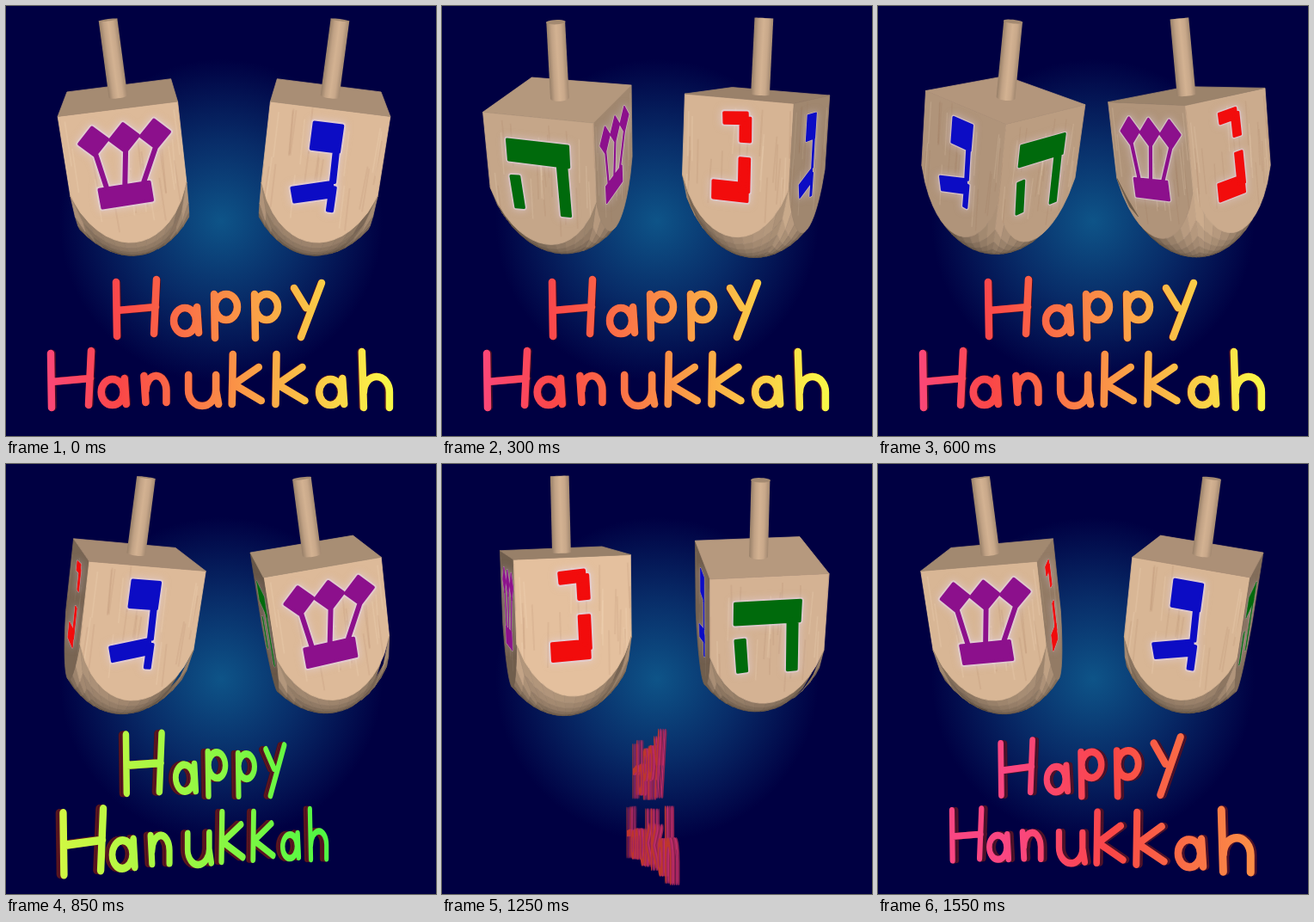
These frames come from a looping animation (500x500 px, 1600 ms). An HTML page with a canvas:

```html
<!DOCTYPE html>
<html lang="en">
<head>
<meta charset="utf-8">
<title>Happy Hanukkah</title>
<style>
  html, body { margin: 0; height: 100%; overflow: hidden; background: #000042; }
  canvas { display: block; }
</style>
</head>
<body>
<canvas id="stage" width="500" height="500" role="img" aria-label="Happy Hanukkah"></canvas>
<script>
const ctx = document.getElementById('stage').getContext('2d');
const LOOP = 1600, STEP = 50, TAU = Math.PI * 2;
const range = (n, f) => Array.from({ length: n }, (_, i) => f(i));
const clamp = (v, lo, hi) => Math.max(lo, Math.min(hi, v));

// Dreidel geometry, measured from its pivot (x right, y up, z to the viewer)
const HALF = 63.5, TOP = 81, STEM_TOP = 167, STEM_R = 10.5, LENGTH = 191;
const LEAN = 0.127, PITCH = 0.3, EYE = 870, PIVOT_Y = 184;
const LIGHT = [0.1, 0.2, 0.97], WOOD = [228, 192, 158];

const shade = k => `rgb(${WOOD.map(c => Math.min(255, c * k) | 0)})`;
// The underside is the end of an ellipsoid
const bottomAt = r => LENGTH - 150 * (1 - Math.sqrt(1 - (r / 95) ** 2));

function random(seed) {
  return () => (seed = (seed * 16807) % 2147483647) / 2147483647;
}

// A straight bar of the given width, as a quad in face coordinates
function bar(x0, y0, x1, y1, width) {
  const k = width / 2 / Math.hypot(x1 - x0, y1 - y0), nx = (y0 - y1) * k, ny = (x1 - x0) * k;
  return [[x0 + nx, y0 + ny], [x1 + nx, y1 + ny], [x1 - nx, y1 - ny], [x0 - nx, y0 - ny]];
}

const SHIN = [-30, 3, 36].flatMap(x => [bar(x - 8, 40, x + 8, 24, 21), bar(x, 44, x * 0.6 - 5, 86, 2)]);
SHIN.push(bar(-31, 97, 24, 95, 21));
const NUN = [bar(-15, 22, 12, 20, 11), bar(10, 20, 11, 45, 11), bar(11, 64, 12, 100, 11), bar(-25, 102, 16, 101, 19)];
const GIMEL = [bar(-15, 31, 15, 31, 29), bar(12, 46, 13, 80, 4), bar(-28, 100, 14, 88, 16), bar(14, 86, 14, 113, 5)];
const HE = [bar(-37, 41, 34, 41, 24), bar(-31, 72, -28, 110, 10), bar(26, 50, 28, 112, 10)];
const SIDES = [[SHIN, '#8c108c'], [NUN, '#f20c0c'], [GIMEL, '#0c0cc4'], [HE, '#006a0c']];

function trace(points) {
  points.forEach(([x, y], i) => i ? ctx.lineTo(x, y) : ctx.moveTo(x, y));
  ctx.closePath();
}

function fillShape(points, style) {
  ctx.beginPath();
  trace(points);
  ctx.fillStyle = style;
  ctx.fill();
}

function dreidel(cx, yaw) {
  const cl = Math.cos(LEAN), sl = Math.sin(LEAN), cy = Math.cos(yaw), sy = Math.sin(yaw);
  const cp = Math.cos(PITCH), sp = Math.sin(PITCH);
  const turn = ([x, y, z]) => {
    [x, y] = [x * cl - y * sl, x * sl + y * cl];
    [x, z] = [x * cy + z * sy, z * cy - x * sy];
    return [x, y * cp - z * sp, z * cp + y * sp];
  };
  const flat = ([x, y, z]) => {
    const s = EYE / (EYE - z);
    return [cx + x * s, PIVOT_Y - y * s];
  };
  const project = p => flat(turn(p));

  // Fills a polygon facing the viewer; returns how squarely it faces, or 0
  function surface(points) {
    const p = points.map(turn), [o, b] = p, a = p[p.length - 1];
    const e = a.map((v, i) => v - o[i]), f = b.map((v, i) => v - o[i]);
    let n = [e[1] * f[2] - e[2] * f[1], e[2] * f[0] - e[0] * f[2], e[0] * f[1] - e[1] * f[0]];
    const len = Math.hypot(...n);
    n = n.map(v => v / len);
    if (n[2] * EYE <= n[0] * o[0] + n[1] * o[1] + n[2] * o[2]) return 0;
    const color = shade(0.45 + 0.6 * n.reduce((t, v, i) => t + v * LIGHT[i], 0));
    fillShape(p.map(flat), color);
    ctx.strokeStyle = color;
    ctx.lineWidth = 0.8;
    ctx.stroke();
    return Math.max(0.12, n[2]);
  }

  function side([parts, color], k) {
    const c = Math.round(Math.cos(k * TAU / 4)), s = Math.round(Math.sin(k * TAU / 4));
    const place = (u, v, w = HALF) => [u * c + w * s, TOP - v, w * c - u * s];
    const bowl = (u, f) => place(u * f, bottomAt(Math.hypot(u, HALF) * f), HALF * f);
    for (let i = 0; i < 10; i++) for (let j = 0; j < 8; j++) {
      const u = (i / 5 - 1) * HALF, v = u + HALF / 5, f = (j + 1) / 8, g = Math.max(0.01, j / 8);
      surface([bowl(u, f), bowl(v, f), bowl(v, g), bowl(u, g)]);
    }
    const arch = range(17, i => bowl((1 - i / 8) * HALF, 1));
    const facing = surface([place(-HALF, 0), place(HALF, 0), ...arch]);
    if (!facing) return;

    ctx.save();
    ctx.clip();
    const rnd = random(71 + k * 13);
    ctx.lineWidth = 2 * facing;
    for (let i = 0; i < 24; i++) {
      const u = (rnd() * 2 - 1) * HALF, v = rnd() * 90;
      ctx.strokeStyle = rnd() < 0.5 ? 'rgba(130,80,50,.08)' : 'rgba(255,230,205,.14)';
      ctx.beginPath();
      ctx.moveTo(...project(place(u, v)));
      ctx.lineTo(...project(place(u + rnd() * 4 - 2, v + 50)));
      ctx.stroke();
    }
    ctx.beginPath();
    parts.forEach(part => trace(part.map(([u, v]) => project(place(u, v)))));
    ctx.lineJoin = 'round';
    ctx.shadowColor = '#e6d8f0';
    ctx.shadowBlur = 8;
    ctx.strokeStyle = 'rgba(230,214,236,.5)';
    ctx.lineWidth = 8 * facing;
    ctx.stroke();
    ctx.shadowBlur = 0;
    ctx.fillStyle = ctx.strokeStyle = color;
    ctx.lineWidth = 4 * facing;
    ctx.fill();
    ctx.stroke();
    ctx.restore();
  }

  function stem() {
    const circle = y => range(24, i => project([STEM_R * Math.cos(i * TAU / 24), y, STEM_R * Math.sin(i * TAU / 24)]));
    const [x0, y0] = project([0, TOP, 0]), [x1, y1] = project([0, STEM_TOP, 0]);
    const len = Math.hypot(x1 - x0, y1 - y0), r = STEM_R * 1.04;
    const nx = (y0 - y1) / len * r, ny = (x1 - x0) / len * r;
    const round = ctx.createLinearGradient(x0 - nx, y0 - ny, x0 + nx, y0 + ny);
    range(5, i => round.addColorStop(i / 4, shade(0.55 + 0.38 * Math.sin(0.3 + i * 0.6))));
    fillShape(circle(TOP), round);
    fillShape(bar(x0, y0, x1, y1, r * 2), round);
    fillShape(circle(STEM_TOP), shade(0.72));
  }

  SIDES.forEach(side);
  surface([[-HALF, TOP, -HALF], [HALF, TOP, -HALF], [HALF, TOP, HALF], [-HALF, TOP, HALF]]);
  stem();
}

// Rounded handwriting built from lines, ovals and arches; y runs up to the baseline at 0
const PEN = {
  line: (p, x, y, ...rest) => {
    p.moveTo(x, y);
    for (let i = 0; i < rest.length; i += 2) p.lineTo(rest[i], rest[i + 1]);
  },
  oval: (p, x, y, rx, ry) => {
    p.moveTo(x + rx, y);
    p.ellipse(x, y, rx, ry, 0, 0, TAU);
  },
  arch: (p, x, y, rx, ry, leg) => {
    p.moveTo(x - rx, y);
    p.ellipse(x, y, rx, ry, 0, Math.PI, TAU);
    p.lineTo(x + rx, y + leg);
  },
  cup: (p, x, y, rx, ry, leg) => {
    p.moveTo(x - rx, y - leg);
    p.ellipse(x, y, rx, ry, 0, Math.PI, 0, true);
    p.lineTo(x + rx, y - leg);
  }
};
const GLYPHS = {
  H: [['line', 4, -63, 5, 0], ['line', 5, -30, 50, -34], ['line', 51, -66, 48, -3]],
  a: [['oval', 17, -18, 13, 15], ['line', 31, -34, 33, -4]],
  p: [['line', 4, -49, 5, 2], ['oval', 18, -34, 13, 15]],
  y: [['line', 3, -56, 17, -33], ['line', 35, -62, 11, 1]],
  n: [['line', 3, -37, 5, -6], ['arch', 17, -20, 12, 17, 14]],
  u: [['cup', 20, -20, 16, 18, 18], ['line', 36, -20, 39, -4]],
  k: [['line', 5, -62, 4, -4], ['line', 35, -47, 6, -27, 38, -8]],
  h: [['line', 3, -65, 5, 0], ['arch', 20, -18, 15, 18, 18]]
};
function glyphPath(char) {
  const path = new Path2D();
  GLYPHS[char].forEach(([tool, ...args]) => PEN[tool](path, ...args));
  return path;
}
const word = (text, x, y, indent, pitch) =>
  [...text].map((char, i) => ({ path: glyphPath(char), x: i ? x + indent + pitch * i : x, y }));
const LETTERS = [...word('Happy', 124, 384, 20, 47), ...word('Hanukkah', 48, 467, 8, 50.7)];
const TEXT_Y = 395, TEXT_EYE = 950, DEPTH = 8, LAYERS = 6;

// Past edge-on the lettering swaps to its readable side
function greeting(turned) {
  const angle = turned > Math.PI / 2 ? turned - Math.PI : turned;
  const c = Math.cos(angle), s = Math.sin(angle), edge = Math.abs(s), deg = angle * 360 / TAU;
  const middle = 249 - 14 * Math.sin(turned);
  const project = (x, y, d) => {
    const k = TEXT_EYE / (TEXT_EYE + (x - 249) * s - d * c);
    return [middle + ((x - 249) * c + d * s) * k, TEXT_Y + (y - TEXT_Y) * k];
  };
  const hue = x => clamp(22 + 0.19 * (x - 249) * c * c + 1.3 * deg + 0.013 * deg * deg, -20, 115);

  function layer({ path, x, y }, d, style) {
    const mx = 20, my = -32;
    const o = project(x + mx, y + my, d), px = project(x + mx + 1, y + my, d), py = project(x + mx, y + my + 1, d);
    const a = px[0] - o[0], b = px[1] - o[1], e = py[0] - o[0], f = py[1] - o[1];
    ctx.setTransform(a, b, e, f, o[0] - a * mx - e * my, o[1] - b * mx - f * my);
    ctx.strokeStyle = style;
    ctx.stroke(path);
  }

  ctx.save();
  ctx.lineCap = ctx.lineJoin = 'round';
  ctx.lineWidth = 8.5;
  const fade = edge ** 6;
  for (const letter of s > 0 ? [...LETTERS].reverse() : LETTERS) {
    for (let i = LAYERS; i > 0; i--) {
      const light = 17 + 24 * edge ** 4 + (i % 3 - 1) * 6 * edge;
      layer(letter, -DEPTH * i / LAYERS, `hsl(${angle > 0 ? 350 : 335} 62% ${light}%)`);
    }
    const front = ctx.createLinearGradient(0, 0, 50, 0);
    range(3, i => front.addColorStop(i / 2, `hsl(${hue(letter.x + 25 * i)} ${95 - 35 * fade}% ${63 - 18 * fade}%)`));
    layer(letter, 0, front);
  }
  ctx.restore();
}

const glow = ctx.createRadialGradient(250, 250, 0, 250, 250, 188);
glow.addColorStop(0, '#0e5488');
glow.addColorStop(0.5, '#082c68');
glow.addColorStop(1, '#000042');

function draw(now) {
  const t = Math.floor(now % LOOP / STEP) * STEP;
  ctx.fillStyle = glow;
  ctx.fillRect(0, 0, 500, 500);
  const yaw = t / LOOP * TAU;
  dreidel(141, yaw);
  dreidel(366, yaw + Math.PI);
  // The lettering rests, then makes a half turn that lingers near edge-on
  const d = clamp((t - 1180) / 455, -1, 1);
  greeting(Math.PI / 2 * (1 + (d + d ** 3) / 2));
}

const start = performance.now();
function tick() {
  draw(performance.now() - start);
  requestAnimationFrame(tick);
}
tick();
</script>
</body>
</html>
```
